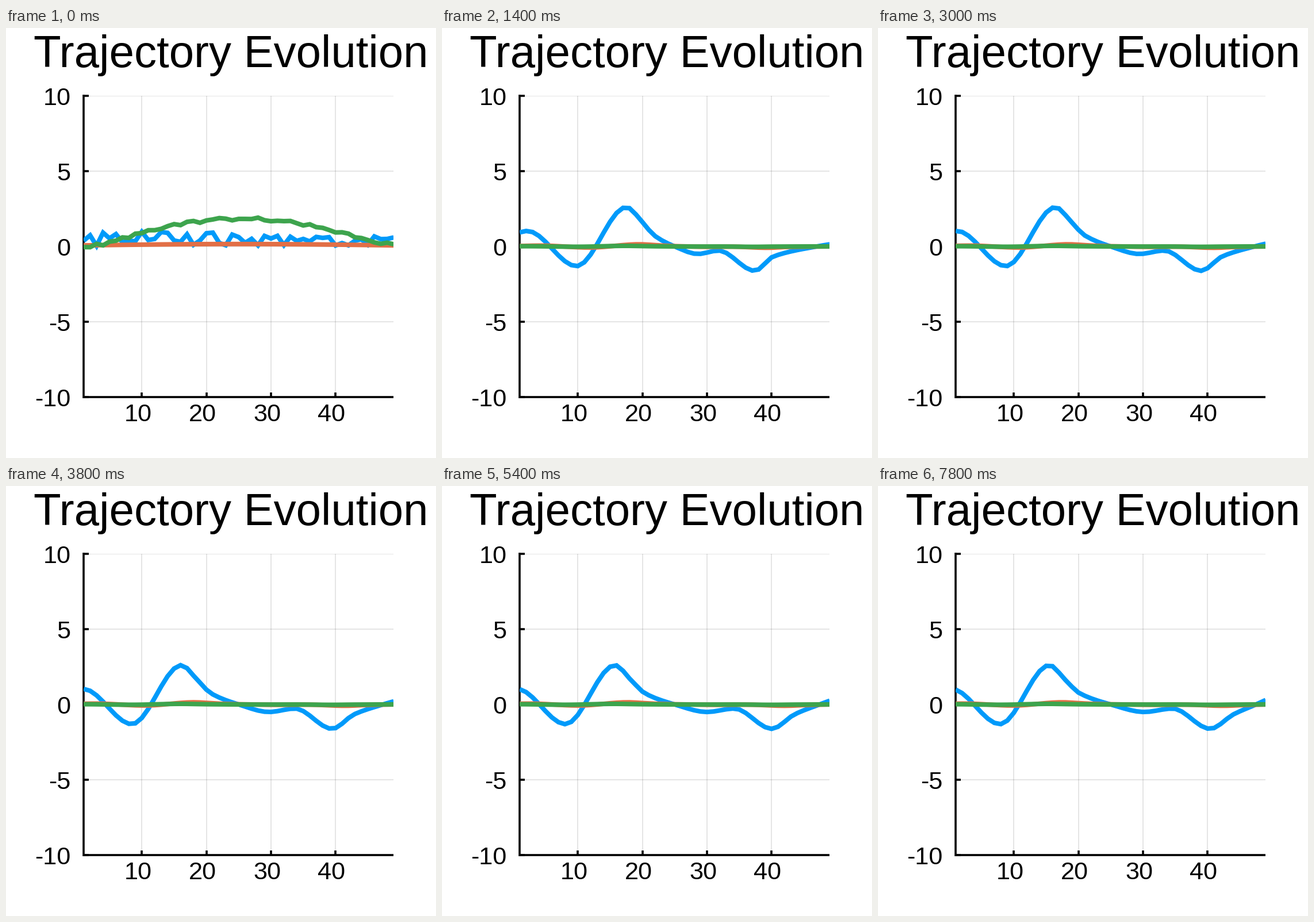
These frames come from a looping animation (748x748 px, 8 s). A matplotlib script:

```python
import numpy as np
import matplotlib.pyplot as plt
from matplotlib.animation import FuncAnimation

SIZE, DPI = 748, 100
FRAMES, STEP_MS = 40, 200
LEFT, RIGHT, TOP, BOTTOM = 135.1, 674.4, 118, 642
BLUE, ORANGE, GREEN = "#009afa", "#e26f46", "#3da44d"
T = np.arange(1, 50)

SETTLED = 7   # frame at which the early jolts have died out
DECAY = .5    # share of the remaining drift left after 8 frames

# Key points of the wave: position when settled, final position, height
KEYS = np.array([
    (-3, -5.5, 0), (2.2, .4, 1.03), (9.8, 7.85, -1.31), (17.5, 15.5, 2.61),
    (20, 18, 1.62), (21.8, 20.2, .74), (25, 25, 0), (28.6, 30.2, -.5),
    (31.8, 34.6, -.27), (37.4, 40.4, -1.62), (40.3, 44, -.66),
    (47, 47.5, 0), (54, 49.8, .45)])

# Early dips: centre, width, depth
JOLTS = [(30, 1.8, .5), (32, .4, 2), (34.4, 1.3, 1.2)]


def smooth_curve(kx, ky, t):
    """Monotone cubic through the key points."""
    h = np.diff(kx)
    d = np.diff(ky) / h
    m = np.concatenate(([d[0]], np.zeros(len(d) - 1), [d[-1]]))
    for i in range(1, len(d)):
        if d[i - 1] * d[i] > 0:
            m[i] = 2 * d[i - 1] * d[i] / (d[i - 1] + d[i])
    t = np.clip(t, kx[0], kx[-1])
    i = np.clip(np.searchsorted(kx, t, side="right") - 1, 0, len(h) - 1)
    s = (t - kx[i]) / h[i]
    return ((1 + 2 * s) * (1 - s) ** 2 * ky[i] + s * (1 - s) ** 2 * h[i] * m[i]
            + s * s * (3 - 2 * s) * ky[i + 1] - s * s * (1 - s) * h[i] * m[i + 1])


def start_curves():
    """Random controls and the noisy arch they lead to."""
    rng = np.random.default_rng(4)
    u = (T - 1) / 48
    arch = np.sin(np.pi * u).clip(0)
    green = 1.88 * arch ** 1.1 + .2 * u - .15 + rng.uniform(-.12, .12, T.size)
    return rng.uniform(0, 1, T.size), .07 + .09 * arch, green


def curves(n):
    if n == 0:
        return start_curves()
    rough = (max(0, SETTLED - n) / 4) ** 2.8
    early = min(1, rough)
    drift = (1 - DECAY ** ((n - SETTLED) / 8)) / (1 - DECAY ** 4) - .26 * early
    x_mid, x_end, height = KEYS.T
    kx = x_mid + drift * (x_end - x_mid)

    def wave(t):
        tail = 1 / (1 + np.exp(-2 * (t - 36)))
        return (1 + .1 * rough) * smooth_curve(kx, height, t) * (1 - early * tail)

    jolt = sum(depth * np.exp(-((T - c) / w) ** 2) for c, w, depth in JOLTS)
    return wave(T) - rough * jolt, .055 * wave(T - 2), .015 * wave(T)


def pt(px):
    return px * 72 / DPI


plt.rcParams["font.family"] = "Liberation Sans"
fig = plt.figure(figsize=(SIZE / DPI, SIZE / DPI), dpi=DPI, facecolor="white")

page = fig.add_axes([0, 0, 1, 1])
page.set(xlim=(0, SIZE), ylim=(SIZE, 0))
page.axis("off")
plot = fig.add_axes([LEFT / SIZE, 1 - BOTTOM / SIZE,
                     (RIGHT - LEFT) / SIZE, (BOTTOM - TOP) / SIZE])
plot.set(xlim=(1, 49), ylim=(-10, 10))
plot.axis("off")


def label(x, y, text, size, align):
    page.text(x, y, text, fontsize=pt(size), ha=align, va="baseline")


def stroke(xs, ys):
    page.plot(xs, ys, color="black", lw=pt(3.6), solid_capstyle="butt")


label(48.5, 68, "Trajectory Evolution", 78, "left")
stroke([LEFT, LEFT], [TOP - 1.8, BOTTOM + 1.8])
stroke([LEFT, RIGHT], [BOTTOM, BOTTOM])

grid = dict(color="black", alpha=.1, lw=pt(2))
for v in range(-10, 11, 5):
    y = BOTTOM - (v + 10) / 20 * (BOTTOM - TOP)
    stroke([LEFT, LEFT + 8.5], [y, y])
    label(112.7, y + 15.8, str(v), 43.3, "right")
    if v > -10:
        plot.axhline(v, **grid)
for v in range(10, 41, 10):
    x = LEFT + (v - 1) / 48 * (RIGHT - LEFT)
    stroke([x, x], [BOTTOM, BOTTOM - 8.5])
    label(x - 6.8, 684, str(v), 43.3, "center")
    plot.axvline(v, **grid)

lines = [plot.plot(T, 0 * T, color=c, lw=pt(8), solid_joinstyle="miter",
                   solid_capstyle="butt", zorder=4)[0] for c in (BLUE, ORANGE, GREEN)]


def update(n):
    for line, ys in zip(lines, curves(n)):
        line.set_ydata(ys)
    return lines


anim = FuncAnimation(fig, update, frames=FRAMES, interval=STEP_MS,
                     repeat=True, repeat_delay=0, blit=False)
plt.show()
```
